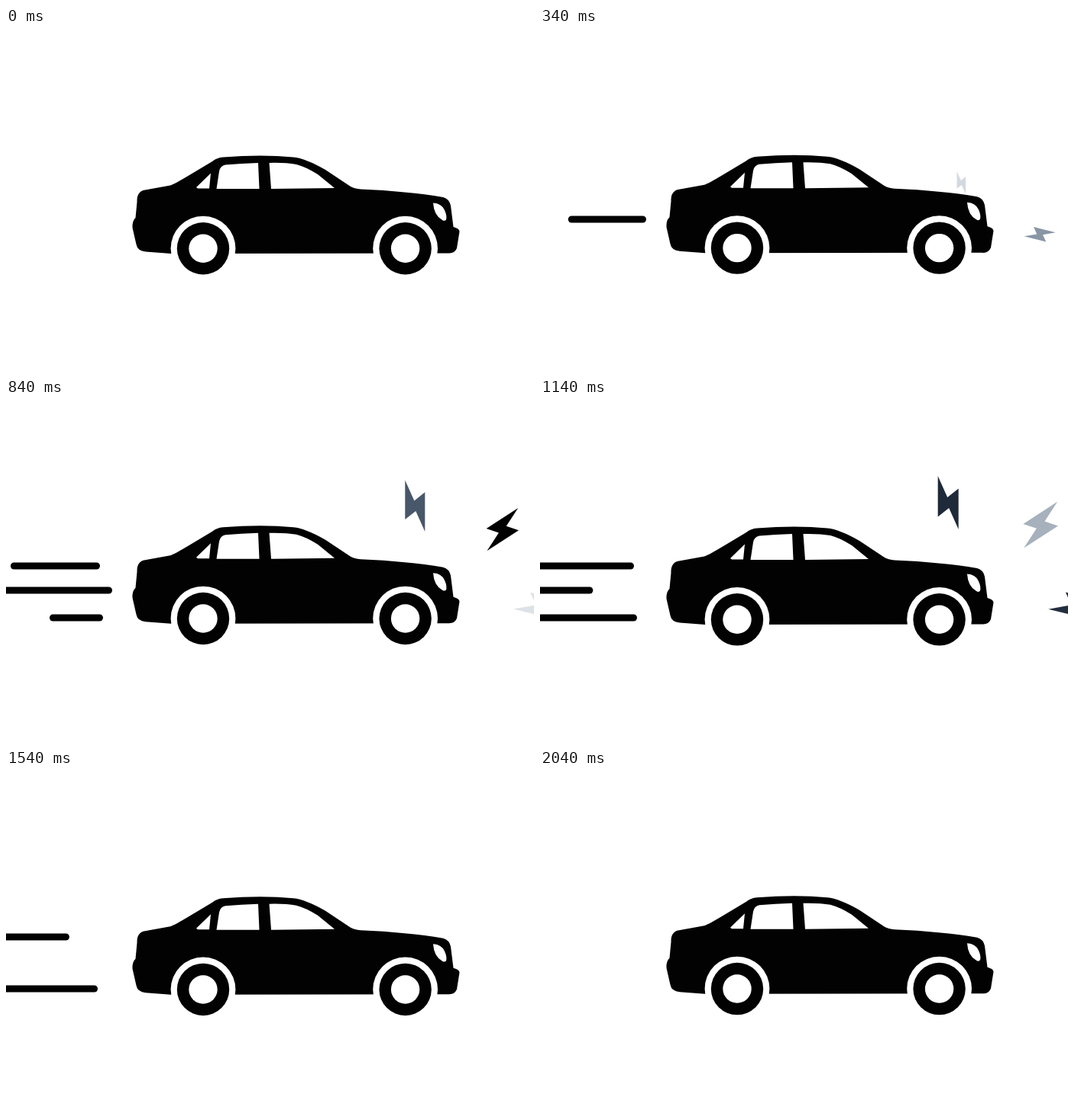
These frames come from a looping animation (691 px wide and 450 px high, 2.14 s). An HTML page with a canvas:

```html
<!DOCTYPE html>
<html lang="en">
<head>
<meta charset="utf-8">
<title>Speeding car</title>
<style>
  html, body { margin: 0; width: 100%; height: 100%; overflow: hidden; background: #fff; }
  canvas { display: block; }
</style>
</head>
<body>
<canvas id="stage" width="691" height="450"></canvas>
<script>
const ctx = document.getElementById('stage').getContext('2d');
const LOOP = 2140;
const INK = '#020202';
const PAPER = '#fff';

// Streaks grow leftwards from their right end, then slide away.
const CAP = 9;
const SLIDE = 0.24;
const STREAKS = [
  { y: 219, right: 123, start: 413, grow: 0.253, leave: 1373 },
  { y: 251, right: 139, start: 66, grow: 0.34, leave: 850 },
  { y: 287, right: 127, start: 535, grow: 0.2, leave: 1511 }
];

// Bolts shoot out by (dx, dy) to rest at (x, y) and flash on the way.
const BOLTS = [
  { x: 534.2, y: 136, dx: -30, dy: -117, turn: 0, start: 170,
    from: 180, peak: 1100, until: 1440, flashes: 1 },
  { x: 655.3, y: 165, dx: 74, dy: -83, turn: 57, start: 260,
    from: 380, peak: 840, until: 1300, flashes: 1 },
  { x: 702.5, y: 271, dx: 108, dy: 0.5, turn: 104, start: 105,
    from: 200, peak: 500, until: 800, flashes: 2 }
];

const clamp = v => Math.min(1, Math.max(0, v));

// Ten frames a second, with one in every five held twice as long.
function heldTime(t) {
  let n = Math.floor((t - 40) / 100);
  if (n % 5 === (n < 10 ? 4 : 2)) n--;
  return Math.max(0, 40 + 100 * n);
}

function drawStreak({ y, right, start, grow, leave }, t) {
  if (t < start) return;
  const head = right - Math.max(0, t - leave) * SLIDE - CAP / 2;
  const tail = right - (t - start) * grow - CAP / 2;
  if (head < -CAP / 2) return;
  ctx.beginPath();
  ctx.moveTo(Math.min(head, tail), y);
  ctx.lineTo(head, y);
  ctx.stroke();
}

function glowAt({ from, peak, until, flashes }, t) {
  const period = until - from;
  if (t < from || t >= from + period * flashes) return 0;
  const age = (t - from) % period;
  const rise = peak - from;
  return age < rise ? age / rise : (period - age) / (period - rise);
}

// White fades through blue grey to black, blue lagging behind red.
function tint(glow) {
  const channels = [1, 0.85, 0.7].map(k => Math.round(255 * (1 - glow) ** k));
  return `rgb(${channels})`;
}

function drawBolt(bolt, t) {
  const glow = glowAt(bolt, t);
  if (glow <= 0) return;
  const rest = (1 - clamp((t - bolt.start) / 1000)) ** 3;
  ctx.save();
  ctx.translate(bolt.x - bolt.dx * rest, bolt.y - bolt.dy * rest);
  ctx.rotate(bolt.turn * Math.PI / 180);
  ctx.scale(1 - rest, 1 - rest);
  ctx.fillStyle = tint(glow);
  ctx.beginPath();
  for (const side of [1, -1]) {
    ctx.lineTo(-13.5 * side, -35 * side);
    ctx.lineTo(-13.5 * side, 18.5 * side);
    ctx.lineTo(side, 7 * side);
  }
  ctx.fill();
  ctx.restore();
}

function disc(x, y, r, color) {
  ctx.fillStyle = color;
  ctx.beginPath();
  ctx.arc(x, y, r, 0, Math.PI * 2);
  ctx.fill();
}

const body = new Path2D(`M216 296 L183 293.5 Q172 292.5 170.5 284 L165.5 262
  Q165 253 169.5 249 L171.5 228 Q171 214 182 212.5 L215 206.5 Q220 205 240 193
  L270 175 Q276 170 284 169.5 Q335 165.5 376 169.5 Q392 171 418 186
  L451 208 Q456 210.5 464 211.5 Q525 214 572 222 Q580 224 582 233
  L585.5 261 Q593.5 263 593.5 267 L590 289 Q587 296 579 295.5 Z`);

const glass = new Path2D(`M249 209 L268 190.5 L266 210.5 L251 210.5 Z
  M275.5 211 L279 188 Q280.5 180.5 287 179.5 Q308 177.5 330 177 L331.5 211 Z
  M344.5 177 Q366 176.5 380 179 Q392 182 408 192 L430 210 L347 211 Z
  M559 229.5 Q570 230 574 239 Q577.5 247 576 251.5 Q574.5 254 571 252 Q560 246 559 229.5 Z`);

// The bounce deepens as the car speeds up.
function bounce(t) {
  const depth = 0.6 + 0.0008 * t;
  return -depth * (1 - Math.cos(2 * Math.PI * (t - 540) / 600)) / 2;
}

function drawCar(t) {
  ctx.save();
  ctx.translate(0, bounce(t));
  ctx.fillStyle = INK;
  ctx.fill(body);
  ctx.fillStyle = PAPER;
  ctx.fill(glass);
  for (const x of [258, 522.6]) {
    disc(x, 289.3, 42.4, PAPER);
    disc(x, 289.3, 34.2, INK);
    disc(x, 289.3, 18.7, PAPER);
  }
  ctx.restore();
}

function draw(t) {
  ctx.fillStyle = PAPER;
  ctx.fillRect(0, 0, 691, 450);
  ctx.strokeStyle = INK;
  ctx.lineWidth = CAP;
  ctx.lineCap = 'round';
  STREAKS.forEach(s => drawStreak(s, t));
  BOLTS.forEach(b => drawBolt(b, t));
  drawCar(t);
}

const origin = performance.now();
function tick() {
  draw(heldTime((performance.now() - origin) % LOOP));
  requestAnimationFrame(tick);
}
tick();
</script>
</body>
</html>
```
